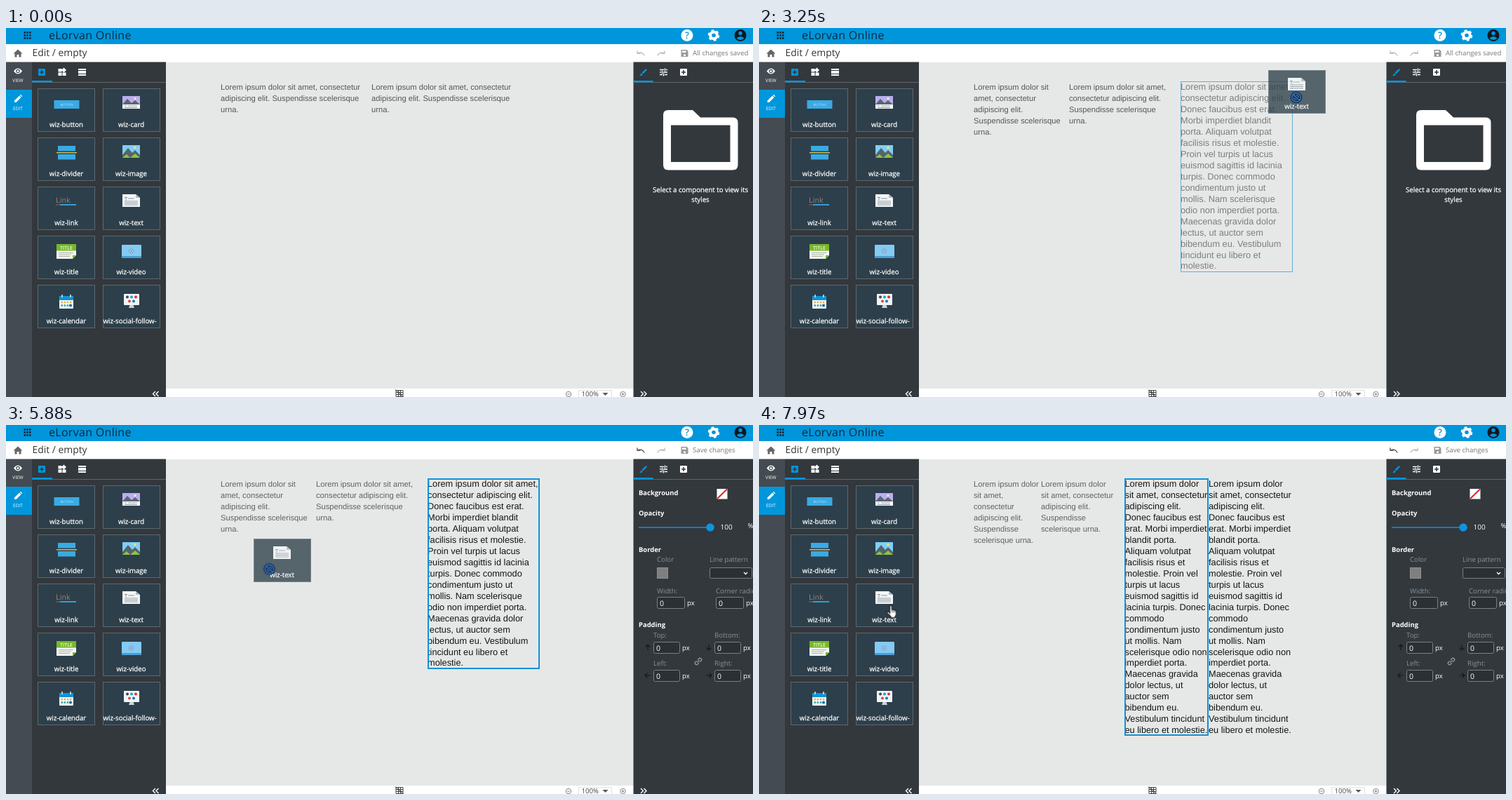
These frames come from a looping animation (1065 by 526 pixels, 8 s). An HTML page:

```html
<!DOCTYPE html>
<html lang="en">
<head>
<meta charset="utf-8">
<title>Page editor</title>
<style>
html, body { margin: 0; width: 100%; height: 100%; overflow: hidden; background: #33383d; }
svg { display: block; width: 1065px; height: 526px; }
text { font: 9.66px 'Open Sans', sans-serif; fill: #fff; text-rendering: geometricPrecision; white-space: pre; }
.mid { text-anchor: middle; }
.label { stroke: #fff; stroke-width: .25; }
.head { font-weight: 700; font-size: 9.45px; }
.dim text { fill: #8b9094; }
.short { font: 11.2px 'Liberation Sans', Arial, sans-serif; fill: #555; }
.long { font: 12.78px 'Liberation Sans', Arial, sans-serif; fill: #141414; }
.faint { fill: #7c7d7d; }
.soft .short { fill: #606060; }
.line { fill: none; stroke: #fff; stroke-width: 1.4; }
.thin { fill: none; stroke: #64aed6; }
.thick { fill: none; stroke: #1093d8; stroke-width: 2; }
.field rect { fill: #2b3035; stroke: #7b8084; }

/* Every animation shares the same 8 s clock */
.two, .under1, .under2, .three, .four, .before, .after, .fresh, .settled, .hover, .hand, .ghost, .stop {
  animation: 8s step-end infinite;
}
.two { animation-name: two; }
.under1 { animation-name: under1; }
.under2 { animation-name: under2; }
.three { animation-name: three; }
.four { animation-name: four; }
.before { animation-name: before; }
.after { animation-name: after; }
.fresh { animation-name: fresh; }
.settled { animation-name: settled; }
.hover { animation-name: hover; }
.hand { animation-name: handPath, handShown; }
.ghost { animation-name: ghostPath, ghostShown; }
.stop { animation-name: stopSpot; }

@keyframes two { 0% { opacity: 1 } 37.875%, 100% { opacity: 0 } }
@keyframes under1 { 0% { opacity: 0 } 33.06% { opacity: 1 } 34.93%, 100% { opacity: 0 } }
@keyframes under2 { 0% { opacity: 0 } 34.93% { opacity: 1 } 37.875%, 100% { opacity: 0 } }
@keyframes three { 0% { opacity: 0 } 37.875% { opacity: 1 } 76.5%, 100% { opacity: 0 } }
@keyframes four { 0% { opacity: 0 } 76.5%, 100% { opacity: 1 } }
@keyframes before { 0% { opacity: 1 } 56.125%, 100% { opacity: 0 } }
@keyframes after { 0% { opacity: 0 } 56.125%, 100% { opacity: 1 } }
@keyframes fresh { 0% { opacity: 1 } 93.875%, 100% { opacity: 0 } }
@keyframes settled { 0% { opacity: 0 } 93.875%, 100% { opacity: 1 } }
@keyframes hover { 0% { opacity: 0 } 93.875% { opacity: 1 } 95.875%, 100% { opacity: 0 } }
@keyframes handShown {
  0% { opacity: 0 } 4.125% { opacity: 1 } 26.5% { opacity: 0 }
  51.375% { opacity: 1 } 69.625% { opacity: 0 } 92%, 100% { opacity: 1 }
}
@keyframes ghostShown {
  0% { opacity: 0 } 26.5% { opacity: 1 } 51.375% { opacity: 0 }
  69.625% { opacity: 1 } 92%, 100% { opacity: 0 }
}
@keyframes stopSpot {
  0% { transform: translate(40px, 39px) }
  60%, 100% { transform: translate(22.5px, 43.5px) }
}
@keyframes handPath {
  0% { transform: translate(691px, 540px) }
  3.175% { transform: translate(691px, 540px); animation-timing-function: steps(11) }
  13.625% { transform: translate(155px, 371px) }
  14.625% { transform: translate(151px, 363px) }
  15.625% { transform: translate(147px, 354px) }
  16.5% { transform: translate(147px, 354px); animation-timing-function: steps(3) }
  19.375% { transform: translate(167px, 297px); animation-timing-function: steps(3) }
  22.25% { transform: translate(178px, 265px) }
  51.375% { transform: translate(787px, 86px) }
  55.163% { transform: translate(787px, 86px); animation-timing-function: steps(5) }
  59.975% { transform: translate(430px, 200px); animation-timing-function: steps(4) }
  63.825% { transform: translate(150px, 286px) }
  64.788% { transform: translate(135px, 288px) }
  65.75% { transform: translate(147px, 282px) }
  67.75% { transform: translate(155px, 274px) }
  68.75% { transform: translate(161px, 270px) }
  92% { transform: translate(732px, 140px) }
  94.938% { transform: translate(732px, 140px); animation-timing-function: steps(5) }
  99.62%, 100% { transform: translate(187px, 257px) }
}
@keyframes ghostPath {
  0% { transform: translate(153px, 222px) }
  26.5% { transform: translate(153px, 222px); animation-timing-function: steps(4) }
  30.25% { transform: translate(262px, 166px); animation-timing-function: steps(4) }
  34% { transform: translate(485px, 91px); animation-timing-function: steps(2) }
  35.875% { transform: translate(664px, 81px); animation-timing-function: steps(4) }
  39.7% { transform: translate(726px, 60px); animation-timing-function: steps(5) }
  44.5% { transform: translate(736px, 41px) }
  46.625% { transform: translate(740px, 44px) }
  47.5% { transform: translate(744px, 47px) }
  69.625% { transform: translate(150px, 222px); animation-timing-function: steps(4) }
  73.5% { transform: translate(353px, 162px); animation-timing-function: steps(4) }
  77.5% { transform: translate(599px, 128px); animation-timing-function: steps(5) }
  82.25% { transform: translate(709px, 94px) }
  86.25% { transform: translate(710px, 94px) }
  87.2% { transform: translate(716px, 95px) }
  88.16% { transform: translate(717px, 96px) }
  89.125%, 100% { transform: translate(709px, 96px) }
}
</style>
</head>
<body>
<svg viewBox="0 0 1065 526">
  <defs>
    <rect id="tile" x=".5" y=".5" width="81" height="61" fill="#2d3f4a" stroke="#596970"/>
    <g id="textTile">
      <use href="#tile"/>
      <path d="M28 11h19l6 5v13h-25z" fill="#f3f6f8"/>
      <path d="M47 11v5h6z" fill="#aebac3"/>
      <path d="M31 15.5h4M33 15.5v4M36 17h9M31 21h19M31 23.5h19M31 26h19" stroke="#8b979f" fill="none"/>
      <text class="mid label" x="40.5" y="55">wiz-text</text>
    </g>
    <g id="plusBox">
      <rect x="-5" y="-5" width="10" height="10" rx="1"/>
      <path d="M-3 0h6M0-3v6" stroke="#33383d" stroke-width="1.6"/>
    </g>
    <path id="undo" d="M5 3.5C3.500-1-1.500-1.500-4-.5M-5-3.500v4h4.500" fill="none" stroke-width="1.2"/>
    <path id="arrow" d="M0 4v-8M-3.500-.5L0-4 3.500-.5" fill="none" stroke="#15191c" stroke-width="1.2"/>
    <path id="ring" d="M6.300 0a6.300 6.300 0 1 1-12.600 0a6.300 6.300 0 1 1 12.600 0M-4.400-4.400l8.800 8.800" fill="none"/>
  </defs>

  <!-- Top bars -->
  <rect width="1065" height="23" fill="#0096dc"/>
  <path d="M25.500 6.500h10M25.500 10.500h10M25.500 14.500h10" stroke="#11222e" stroke-width="2.500" stroke-dasharray="2.500 1.250"/>
  <text x="61" y="16" style="font-size:16px;letter-spacing:.3px;fill:#0d2a3c">eLorvan Online</text>
  <circle cx="971" cy="10.500" r="8.500" fill="#fff"/>
  <text class="mid" x="971" y="15" style="font-size:13px;font-weight:600;fill:#0096dc">?</text>
  <g fill="none" stroke="#fff" transform="translate(1009 10.500)">
    <circle r="4.800" stroke-width="4"/>
    <circle r="7" stroke-width="2.600" stroke-dasharray="3.665"/>
  </g>
  <circle cx="1047" cy="10.500" r="8.500" fill="#10181f"/>
  <circle cx="1047" cy="7.500" r="2.700" fill="#0096dc"/>
  <path d="M1041.500 14.500q5.500-5 11 0q-5.500 5-11 0z" fill="#0096dc"/>
  <rect y="23" width="1065" height="26" fill="#fff"/>
  <path d="M17 30.500l6.500 6h-2v5h-3v-3.500h-3v3.500h-3v-5h-2z" fill="#666"/>
  <text x="37.500" y="40.300" style="font-size:13.9px;fill:#333">Edit / empty</text>
  <use href="#undo" x="905" y="36" stroke="#b5b5b5"/>
  <use class="after" href="#undo" x="905" y="36" stroke="#555"/>
  <use href="#undo" transform="translate(934 36) scale(-1 1)" stroke="#b5b5b5"/>
  <path d="M962.500 31h8l2 2v8h-10z" fill="#999"/>
  <path d="M964 32.500h5.500v2.500h-5.500zM966 37.500h3v2.500h-3z" fill="#fff"/>
  <text class="before" x="979" y="39" style="fill:#777">All changes saved</text>
  <text class="after" x="979" y="39" style="fill:#777">Save changes</text>

  <!-- Mode rail -->
  <rect y="48.500" width="37" height="478" fill="#444b52"/>
  <rect y="88" width="37" height="40" fill="#0096dc"/>
  <path d="M11 61.500q6-8 12 0q-6 8-12 0z" fill="#fff"/>
  <circle cx="17" cy="61.500" r="2.200" fill="#fff" stroke="#444b52" stroke-width="1.200"/>
  <path d="M12 106v-2.500l7-7 2.500 2.500-7 7zM19.800 95.800l1-1 2.500 2.500-1 1z" fill="#fff"/>
  <text class="mid" x="17" y="77" style="font-size:6.500px">VIEW</text>
  <text class="mid" x="17" y="117" style="font-size:6.500px">EDIT</text>

  <!-- Component panel -->
  <rect x="37" y="48.500" width="191" height="478" fill="#33383d"/>
  <path d="M37 77.500h191" stroke="#62676b"/>
  <rect x="37" y="75" width="29" height="2.500" fill="#0096dc"/>
  <use href="#plusBox" x="51" y="63" fill="#0096dc"/>
  <path d="M74.500 58h5v4.500h-5zM74.500 63.500h5v4.500h-5zM80.500 63.500h5v4.500h-5zM82.500 56.500l3.500 3.500-3.500 3.500-3.500-3.500z" fill="#fff"/>
  <path d="M103 58h11v2h-11zM103 61h11v4h-11zM103 66h11v2h-11z" fill="#fff"/>

  <g transform="translate(45 86)">
    <use href="#tile"/>
    <rect x="23.500" y="17" width="36" height="12" fill="#3aaae4"/>
    <text class="mid" x="41.500" y="25" style="font-size:4.500px;fill:#c2e3f6">BUTTON</text>
    <text class="mid label" x="41" y="55">wiz-button</text>
  </g>
  <g transform="translate(138 86)">
    <use href="#tile"/>
    <rect x="28" y="11" width="25" height="18" fill="#fff"/>
    <rect x="28" y="11" width="25" height="12" fill="#b9aef0"/>
    <path d="M28 23l7-8 6 6 5-4 7 6z" fill="#5c6470"/>
    <circle cx="46" cy="14.500" r="1.500" fill="#fff6b0"/>
    <path d="M31 25h3M36 25h13M31 27.500h18" stroke="#8a94a0"/>
    <text class="mid label" x="40.500" y="55">wiz-card</text>
  </g>
  <g transform="translate(45 156)">
    <use href="#tile"/>
    <path d="M29 12h25v7.500h-25zM29 24h25v7.500h-25z" fill="#3aaae4"/>
    <rect x="27" y="21" width="29" height="1.500" fill="#d3c14e"/>
    <text class="mid label" x="41" y="55">wiz-divider</text>
  </g>
  <g transform="translate(138 156)">
    <use href="#tile"/>
    <rect x="28" y="11" width="25" height="18" fill="#80cff6"/>
    <path d="M28 29v-4l8-10 6 7 4-4 7 7v4z" fill="#56636c"/>
    <path d="M28 29l6-5 5 5zM39 29l7-6 7 6z" fill="#8cc63f"/>
    <circle cx="46" cy="14.500" r="1.700" fill="#ffe36a"/>
    <text class="mid label" x="40.500" y="55">wiz-image</text>
  </g>
  <g transform="translate(45 226)">
    <use href="#tile"/>
    <text x="26" y="23" style="font:10.200px 'DejaVu Sans',sans-serif;fill:#8f7d79">Link</text>
    <path d="M26 26h6" stroke="#7d5347" stroke-width="1.500"/>
    <path d="M32 26h23" stroke="#2f9fdc" stroke-width="2"/>
    <text class="mid label" x="41" y="55">wiz-link</text>
  </g>
  <use href="#textTile" x="138" y="226"/>
  <g transform="translate(45 296)">
    <use href="#tile"/>
    <path d="M27 21h28v7l-5 5h-23z" fill="#f6f8f4"/>
    <path d="M27 12h28v9.500h-28zM50 33v-5h5z" fill="#76b82a"/>
    <path d="M30 24.500h21M30 27h18M30 29.500h16" stroke="#a5b29a"/>
    <text class="mid" x="41" y="19.500" style="font-size:7px;font-weight:600;fill:#eff8dd">TITLE</text>
    <text class="mid label" x="41" y="55">wiz-title</text>
  </g>
  <g transform="translate(138 296)">
    <use href="#tile"/>
    <rect x="27" y="13" width="28" height="19" rx="1" fill="#84caf3"/>
    <rect x="27" y="29" width="28" height="3" fill="#4a9ed2"/>
    <circle cx="40.500" cy="22" r="3" fill="#a9dbf7" stroke="#5a8db2" stroke-width=".8"/>
    <path d="M39.700 20.500l2.300 1.500-2.300 1.500z" fill="#c0525a"/>
    <text class="mid label" x="40.500" y="55">wiz-video</text>
  </g>
  <g transform="translate(45 366)">
    <use href="#tile"/>
    <rect x="31" y="16" width="20" height="18" rx="1" fill="#f4f8fa"/>
    <rect x="31" y="16" width="20" height="6" rx="1" fill="#0d95d8"/>
    <path d="M35 14v4M47 14v4" stroke="#dfe9ee" stroke-width="1.500"/>
    <path d="M33.500 25h15" stroke="#e8b04a" stroke-width="2.500" stroke-dasharray="2.500 1.600"/>
    <path d="M33.500 29.500h15" stroke="#2ba39b" stroke-width="2.500" stroke-dasharray="2.500 1.600"/>
    <circle cx="47" cy="29.500" r="2" fill="#0b6fb0"/>
    <text class="mid label" x="41" y="55">wiz-calendar</text>
  </g>
  <g transform="translate(138 366)">
    <use href="#tile"/>
    <rect x="30" y="13" width="22" height="16" rx="1" fill="#f0f4f6"/>
    <path d="M38.500 29h5l1.500 4h-8z" fill="#c9d4da"/>
    <circle cx="35" cy="17.500" r="2" fill="#3b4450"/>
    <circle cx="41" cy="17.500" r="2" fill="#1da1dd"/>
    <circle cx="47" cy="17.500" r="2" fill="#d9342b"/>
    <circle cx="38" cy="23.500" r="2" fill="#e0483c"/>
    <circle cx="44" cy="23.500" r="2" fill="#0b78b5"/>
    <text class="label" x=".5" y="55">wiz-social-follow-</text>
  </g>
  <path class="line" d="M213 518l-3.500 3.500 3.500 3.500M217.500 518l-3.500 3.500 3.500 3.500"/>

  <!-- Canvas -->
  <rect x="228" y="49" width="667" height="465" fill="#e6e8e8"/>
  <rect x="228" y="514" width="667" height="12" fill="#fff"/>
  <path d="M556 516.500h10v9h-10zM556 519.500h10M556 522.500h10M559.500 516v10M562.500 516v10M555 515.500l12 11" stroke="#444" fill="none"/>
  <path d="M816.500 526v-9.500h47v9.500" stroke="#e0e0e0" fill="none"/>
  <text x="820.500" y="525" style="fill:#444">100%</text>
  <path d="M850.500 520h8l-4 4z" fill="#555"/>
  <path d="M800 522h4M877.500 522h4M879.500 520v4M805.700 522a3.700 3.700 0 1 1-7.400 0a3.700 3.700 0 1 1 7.400 0M883.200 522a3.700 3.700 0 1 1-7.400 0a3.700 3.700 0 1 1 7.400 0" fill="none" stroke="#777" stroke-width=".9"/>

  <g class="two">
    <text class="short" x="306" y="88.300" data-rows="641"></text>
    <text class="short" x="521" y="88.300" data-rows="641"></text>
    <g class="under1">
      <text class="long faint" x="306" y="136" data-rows="545466455555"></text>
      <rect class="thin" x="306.500" y="124.500" width="215" height="191"/>
    </g>
    <g class="under2">
      <text class="long faint" x="521" y="136" data-rows="545466455555"></text>
      <rect class="thin" x="521.500" y="124.500" width="215" height="191"/>
    </g>
  </g>

  <g class="three">
    <g class="before">
      <text class="short" x="306" y="88.300" data-rows="42221"></text>
      <text class="short" x="442" y="88.300" data-rows="5321"></text>
      <text class="long faint" x="601" y="88.300" data-rows="53433454333434341"></text>
      <rect class="thin" x="601.500" y="76.500" width="159" height="271"/>
    </g>
    <g class="after soft">
      <text class="short" x="306" y="88.300" data-rows="42221"></text>
      <text class="short" x="442" y="88.300" data-rows="5321"></text>
      <text class="long" x="601" y="88.300" data-rows="53433454333434341"></text>
      <rect class="thick" x="602" y="77" width="158" height="270"/>
    </g>
  </g>

  <g class="four soft">
    <text class="short" x="306" y="88.300" data-rows="321212"></text>
    <text class="short" x="402" y="88.300" data-rows="33212"></text>
    <text class="long faint fresh" x="521.500" y="88.300" data-rows="33233223333312332232224"></text>
    <text class="long settled" x="521.500" y="88.300" data-rows="33233223333312332232224"></text>
    <text class="long" x="641" y="88.300" data-rows="33233223333312332232224"></text>
    <rect class="thin hover" x="641.500" y="76.500" width="119" height="366"/>
    <rect class="thick" x="522" y="77" width="118" height="365"/>
  </g>

  <!-- Style panel -->
  <rect x="894.500" y="48.500" width="171" height="478" fill="#33383d"/>
  <path d="M894.500 77.500h171" stroke="#62676b"/>
  <rect x="894.500" y="75" width="28" height="2.500" fill="#0096dc"/>
  <path d="M912.500 58l1.500 1.500-5.500 6-2-2zM905.700 64.200l2 2q-1 2.500-4.700 1.800q1.700-1 2.700-3.800z" fill="#0096dc"/>
  <path class="line" d="M932 59.500h6M941 59.500h2M932 63h2M937 63h6M932 66.500h4M939 66.500h4M939.500 57.500v4M935.500 61v4M937.500 64.500v4"/>
  <use href="#plusBox" x="966" y="63" fill="#fff"/>
  <path class="line" d="M905 518l3.500 3.500-3.500 3.500M909.500 518l3.500 3.500-3.500 3.500"/>

  <g class="before">
    <path fill="#fff" fill-rule="evenodd" d="M944 117h35l11 10.500h46q7.500 0 7.500 7.500v60q0 7.500-7.500 7.500h-92q-7 0-7-7.500v-71q0-7 7-7zM948 138.500v52.500h84.500v-52.500z"/>
    <text class="mid label" x="990" y="233.500">Select a component to view its</text>
    <text class="mid label" x="990" y="247.500">styles</text>
  </g>

  <g class="after">
    <text class="head" x="902" y="100">Background</text>
    <text class="head" x="902" y="129">Opacity</text>
    <text class="head" x="902" y="181">Border</text>
    <text class="head" x="902" y="288">Padding</text>
    <rect x="1013.500" y="91" width="15" height="14.500" fill="#fff"/>
    <path d="M1014 105l14-13.500" stroke="#d9262c" stroke-width="2"/>
    <path d="M902 146h102" stroke="#0f93dc" stroke-width="1.600"/>
    <circle cx="1004" cy="146" r="5.800" fill="#0f93dc"/>
    <text x="1018.500" y="149" style="font-size:10px">100</text>
    <text x="1057.500" y="147">%</text>
    <g class="dim">
      <text x="928" y="195">Color</text>
      <text x="1003" y="195">Line pattern</text>
      <text x="928" y="239.500">Width:</text>
      <text x="1012" y="239.500">Corner radius:</text>
      <text x="923" y="303">Top:</text>
      <text x="1010" y="303">Bottom:</text>
      <text x="923" y="343">Left:</text>
      <text x="1010" y="343">Right:</text>
    </g>
    <rect x="928.500" y="203.500" width="15" height="15" fill="#807f7f" stroke="#909090"/>
    <rect x="1003.500" y="203.500" width="60" height="15" rx="2" fill="#2b3035" stroke="#7b8084"/>
    <path class="line" d="M1052 210l2.500 2.500 2.500-2.500"/>
    <g id="fields"></g>
    <use href="#arrow" x="915" y="317"/>
    <use href="#arrow" transform="translate(1002 317) rotate(180)"/>
    <use href="#arrow" transform="translate(915 357) rotate(-90)"/>
    <use href="#arrow" transform="translate(1002 357) rotate(90)"/>
    <path transform="translate(987 337) rotate(-45)" fill="none" stroke="#92979b" stroke-width="1.300" d="M-1-2.200h-2.500a2.200 2.200 0 0 0 0 4.400h2.500M1-2.200h2.500a2.200 2.200 0 0 1 0 4.400h-2.500M-2.500 0h5"/>
  </g>

  <!-- Dragged tile and pointers -->
  <g class="ghost">
    <use href="#textTile" opacity=".78"/>
    <g class="stop">
      <use href="#ring" stroke="#0b2549" stroke-width="4"/>
      <use href="#ring" stroke="#2f76c8" stroke-width="1.700"/>
    </g>
  </g>
  <g class="hand">
    <g transform="scale(.95) translate(-5 -.5)">
      <path d="M4.500 1.500q1.500-1.500 3 0v5.500q1.600-.8 2.300.6q1.600-.6 2.200.7q1.800-.3 2 1.400v4q0 2-1.500 3.500v1.800h-6.500v-1.800l-5-4.700q-1-1.900.3-2.300q1.400-.3 3.200 2.300z" fill="#fff" stroke="#111" stroke-width="1.100"/>
      <path d="M7.700 7.500v4M9.900 8.200v3.300M11.900 9.200v2.300" stroke="#333" stroke-width=".8"/>
    </g>
  </g>
</svg>
<script>
const ns = 'http://www.w3.org/2000/svg';
const shortText = 'Lorem ipsum dolor sit amet, consectetur adipiscing elit. Suspendisse scelerisque urna.';
const longText = 'Lorem ipsum dolor sit amet, consectetur adipiscing elit. Donec faucibus est erat. ' +
  'Morbi imperdiet blandit porta. Aliquam volutpat facilisis risus et molestie. ' +
  'Proin vel turpis ut lacus euismod sagittis id lacinia turpis. Donec commodo ' +
  'condimentum justo ut mollis. Nam scelerisque odio non imperdiet porta. ' +
  'Maecenas gravida dolor lectus, ut auctor sem bibendum eu. Vestibulum tincidunt eu libero et molestie.';

function add(parent, tag, attrs, content = '') {
  const el = document.createElementNS(ns, tag);
  for (const key in attrs) el.setAttribute(key, attrs[key]);
  el.textContent = content;
  parent.append(el);
  return el;
}

// data-rows holds the number of words on each line
for (const el of document.querySelectorAll('[data-rows]')) {
  const words = (el.classList.contains('long') ? longText : shortText).split(' ');
  [...el.dataset.rows].forEach((count, row) => {
    const line = words.splice(0, +count).join(' ');
    add(el, 'tspan', { x: el.getAttribute('x'), dy: row ? 15.95 : 0 }, line);
  });
}

const fields = document.getElementById('fields');
for (const [x, y, w] of [[928, 245, 40], [1012, 245, 40], [923, 309, 38], [1010, 309, 38], [923, 349, 38], [1010, 349, 38]]) {
  const g = add(fields, 'g', { class: 'field', transform: `translate(${x} ${y})` });
  add(g, 'rect', { x: .5, y: .5, width: w - 1, height: 16, rx: 2 });
  add(g, 'text', { x: 4, y: 12.5, style: 'font-size:10.5px' }, '0');
  add(g, 'text', { x: w + 3, y: 11.5 }, 'px');
}
</script>
</body>
</html>
```
